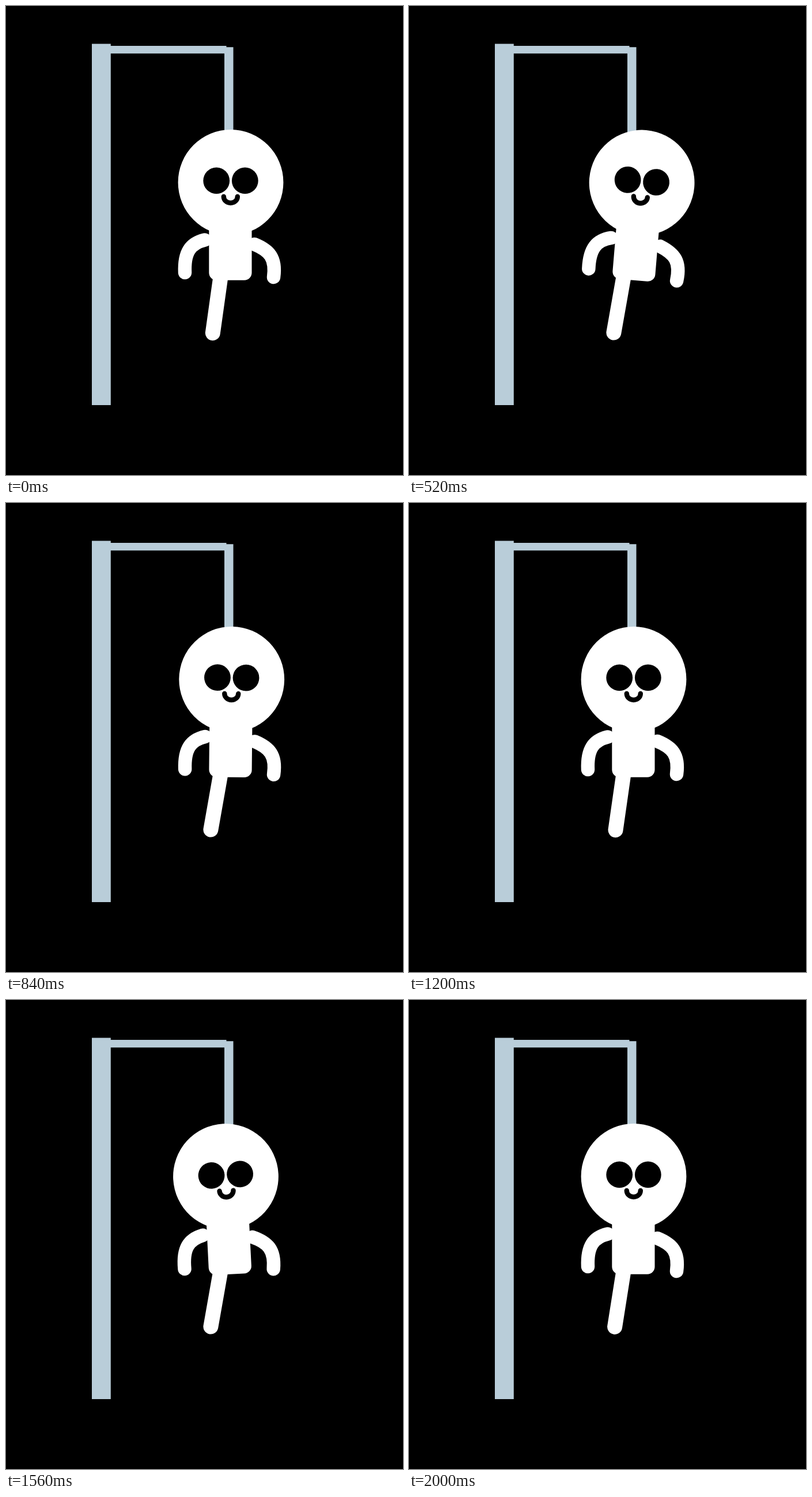
These frames come from a looping animation (689 px wide and 812 px high, 2040 ms). An HTML page:

```html
<!DOCTYPE html>
<html lang="en">
<head>
<meta charset="utf-8">
<title>Swinging figure</title>
<style>
  html, body { margin: 0; width: 100%; height: 100%; overflow: hidden; background: #000; }
  svg { display: block; width: 100vw; height: 100vh; }
  .limb { fill: none; stroke: #fff; stroke-linecap: round; }
</style>
</head>
<body>
<svg viewBox="0 0 689 812">
  <g fill="#b9cdd9">
    <path d="M149 65.5H181.8V691H149Z"/>
    <path d="M181 69H382.5V82.3H181Z"/>
    <path d="M379 71.3H394.5V240H379Z"/>
  </g>
  <path id="leg" class="limb" stroke-width="26"/>
  <g id="body">
    <circle cx="390" cy="305.4" r="91.4" fill="#fff"/>
    <rect x="352.3" y="360" width="74.2" height="114.8" rx="13" fill="#fff"/>
    <g class="limb" stroke-width="23.5">
      <path d="M345 405C320 411 309 426 310.5 461.5"/>
      <path d="M431 412.5C457 423 469 436 464.5 469.5"/>
    </g>
    <circle cx="365.2" cy="302.4" r="22.9"/>
    <circle cx="414.8" cy="302.4" r="22.9"/>
    <path d="M377.8 330A12 11 0 0 0 401.8 330" fill="none" stroke="#000" stroke-width="8.4" stroke-linecap="round"/>
  </g>
</svg>
<script>
const LOOP = 2040, STEP = 40;
const body = document.getElementById('body');
const leg = document.getElementById('leg');

const bump = (t, peak, width) => Math.exp(-(((t - peak) / width) ** 2));

const smooth = (t, start, length) => {
  const u = Math.min(1, Math.max(0, (t - start) / length));
  return u * u * (3 - 2 * u);
};

// Rises after start, falls back to zero at end
const hold = (t, start, end) => smooth(t, start, 220) - smooth(t, end - 220, 220);

function draw(now) {
  const t = Math.floor((now % LOOP) / STEP) * STEP;
  const tilt = 5.4 * bump(t, 580, 174) - 4.9 * bump(t, 1636, 105);
  const kick = hold(t, 40, 1120) + hold(t, 1160, 2110);
  body.setAttribute('transform', `rotate(${tilt} 390 474)`);
  leg.setAttribute('d', `M372.3 470L${358.8 - 3.4 * kick} ${566.2 - 0.6 * kick}`);
}

const start = performance.now();
function tick() {
  draw(performance.now() - start);
  requestAnimationFrame(tick);
}
tick();
</script>
</body>
</html>
```
